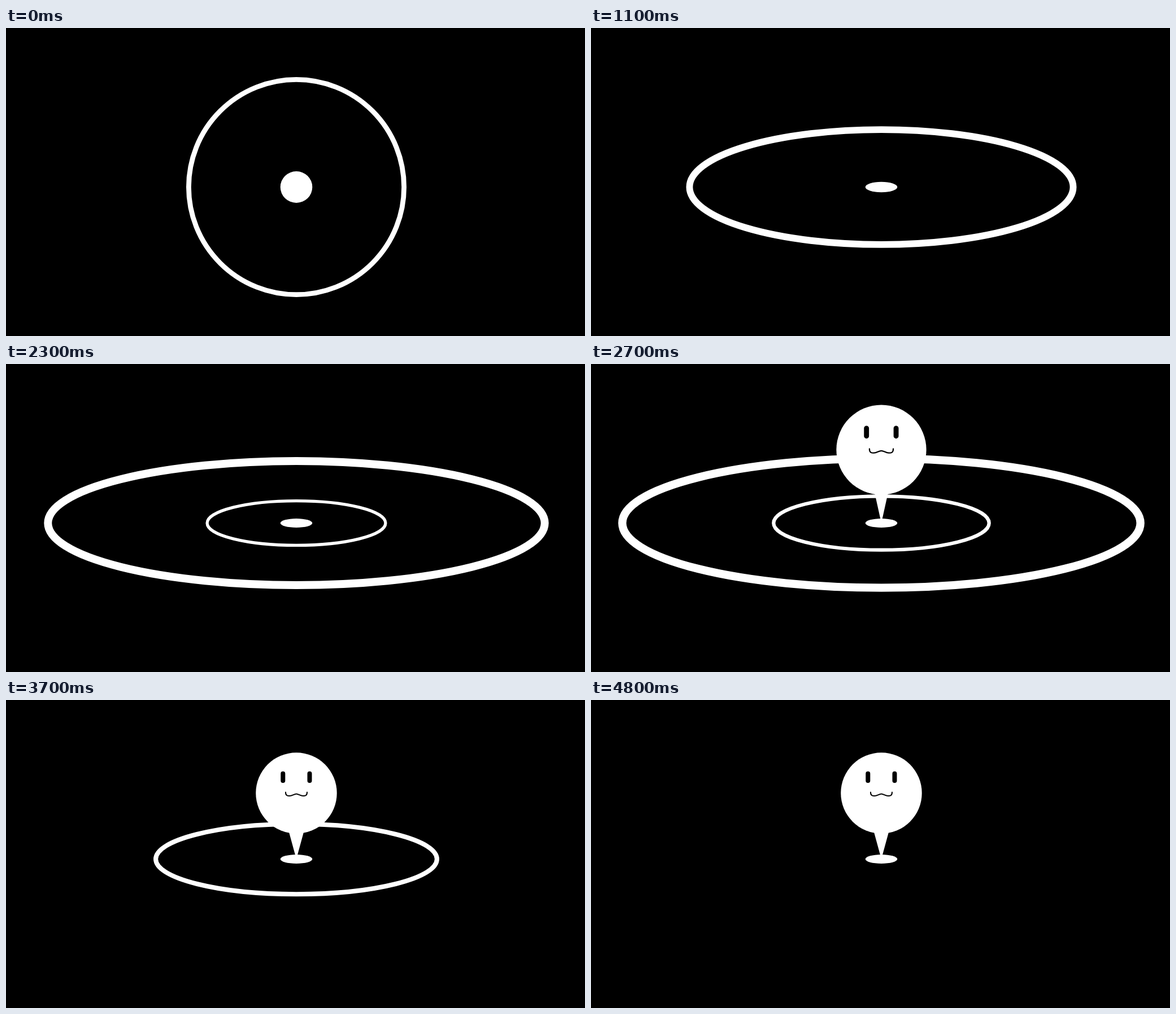
Recreate the animation shown at these times as an HTML page with a canvas. Size 1025 by 546 pixels, loop 7100 ms.

```html
<!DOCTYPE html>
<html lang="en">
<head>
<meta charset="utf-8">
<title>Map pin ripple</title>
<style>
  html, body { margin: 0; width: 100%; height: 100%; overflow: hidden; background: #000; }
  canvas { display: block; width: 1025px; height: 546px; }
</style>
</head>
<body>
<canvas id="stage" width="1025" height="546"></canvas>
<script>
const ctx = document.getElementById('stage').getContext('2d');
const LOOP = 7100, STEP = 100, LAST_STEP = 48;
const CX = 514, CY = 282;

// Ground tilt: [step, height ratio, slope]
const TILT = [[0, 1, -0.11], [5, 0.538, -0.069], [8, 0.374, -0.039], [11, 0.3, -0.016], [18, 0.25, 0]];

function hermite(keys, x) {
  for (let k = 1; k < keys.length; k++) {
    const [x0, y0, m0] = keys[k - 1], [x1, y1, m1] = keys[k];
    if (x > x1) continue;
    const h = x1 - x0, u = (x - x0) / h, v = 1 - u;
    return v * v * ((1 + 2 * u) * y0 + u * h * m0) + u * u * ((3 - 2 * u) * y1 - v * h * m1);
  }
  return keys[keys.length - 1][1];
}

const easeOutQuad = p => 1 - (1 - p) ** 2;

function easeOutBack(p, overshoot) {
  const q = 1 - p;
  return 1 + overshoot * q * q - (overshoot + 1) * q ** 3;
}

function ellipse(rx, ry) {
  ctx.beginPath();
  ctx.ellipse(0, 0, rx, ry, 0, 0, Math.PI * 2);
}

// The outer half width includes the stroke, which keeps an even weight when tilted.
function ring(outer, weight, tilt) {
  const rx = outer - weight / 2;
  if (rx <= 0) return;
  ctx.lineWidth = weight;
  ellipse(rx, rx * tilt);
  ctx.stroke();
}

function pin(scale) {
  const half = 15 * Math.min(scale, 1 / scale);
  ctx.beginPath();
  ctx.moveTo(0, 0);
  ctx.lineTo(-half, -55 * scale);
  ctx.lineTo(half, -55 * scale);
  ctx.fill();

  ctx.save();
  ctx.scale(scale, scale);
  ctx.beginPath();
  ctx.arc(0, -117, 71.75, 0, Math.PI * 2);
  ctx.fill();

  ctx.strokeStyle = '#000';
  ctx.lineCap = 'round';
  ctx.lineWidth = 8;
  ctx.beginPath();
  for (const x of [-23.7, 23.5]) {
    ctx.moveTo(x, -151.5);
    ctx.lineTo(x, -139);
  }
  ctx.stroke();

  ctx.lineWidth = 2;
  ctx.beginPath();
  ctx.moveTo(-19, -118.5);
  ctx.bezierCurveTo(-19, -112.5, -16, -112, -12, -112);
  ctx.bezierCurveTo(-7, -112, -4, -115.5, 0, -115.5);
  ctx.bezierCurveTo(4, -115.5, 7, -112, 12, -112);
  ctx.bezierCurveTo(16, -112, 19, -112.5, 19, -118.5);
  ctx.stroke();
  ctx.restore();
}

function draw(step) {
  const tilt = hermite(TILT, step);
  ctx.setTransform(1, 0, 0, 1, 0, 0);
  ctx.fillStyle = '#000';
  ctx.fillRect(0, 0, 1025, 546);
  ctx.translate(CX, CY);
  ctx.fillStyle = ctx.strokeStyle = '#fff';

  if (step <= 30) {
    const outer = 195 + 16.2 * step - 0.2285 * step * step;
    ring(outer, 4.8 + 0.0205 * outer, tilt);
  }
  if (step > 9 && step < LAST_STEP) {
    const outer = 278 * easeOutQuad((step - 9) / 40);
    ring(outer, 0.3 + 0.031 * outer, tilt);
  }

  ellipse(28.3, 28 * tilt + 1.3 * (1 - tilt));
  ctx.fill();

  if (step > 24) pin(easeOutBack(Math.min(1, (step - 24.2) / 8.42), 2.75));
}

const start = performance.now();
function tick() {
  const time = (performance.now() - start) % LOOP;
  draw(Math.min(LAST_STEP, Math.floor(time / STEP)));
  requestAnimationFrame(tick);
}
tick();
</script>
</body>
</html>
```
